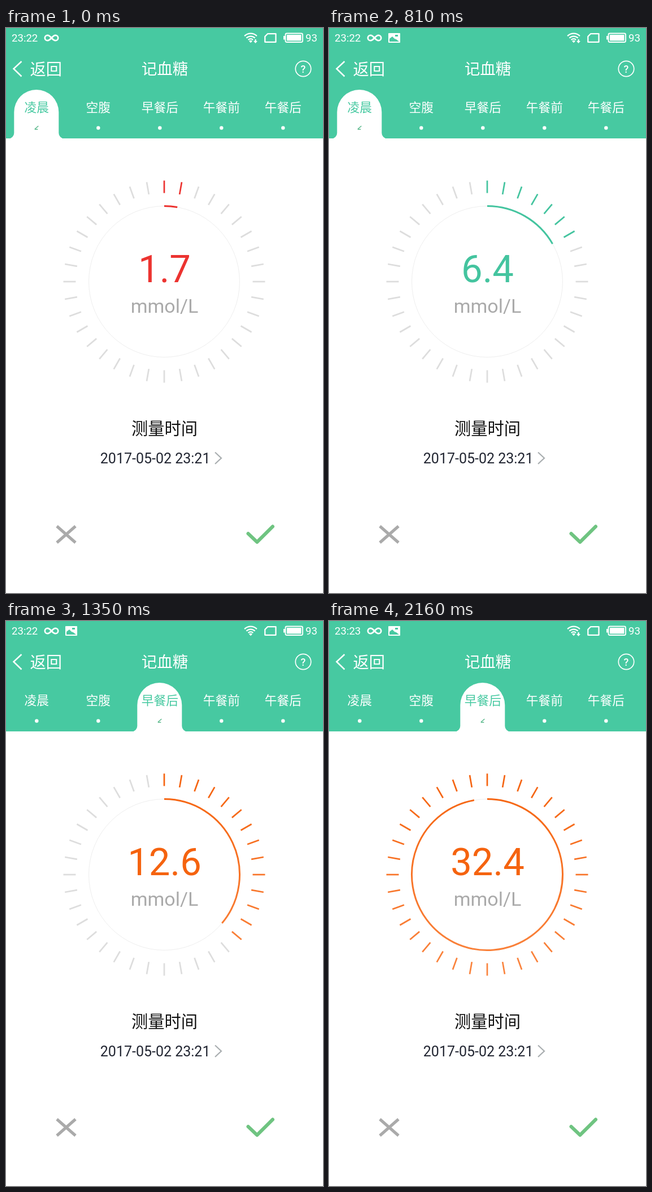
Write an HTML page that moves like this. It is 561 px wide and 998 px high and loops after 2430 ms.

```html
<!DOCTYPE html>
<html lang="zh-CN">
<head>
<meta charset="utf-8">
<title>记血糖</title>
<style>
  html, body { margin: 0; width: 100%; height: 100%; overflow: hidden; background: #fff; }
  svg { display: block; width: 100%; height: 100%; }
  text { font-family: Roboto, "Noto Sans CJK SC", "Noto Sans CJK", sans-serif; }
  .cjk { font-family: "Noto Sans CJK SC", "Noto Sans CJK", sans-serif; font-weight: 300; }
  .line { fill: none; stroke: #fff; }
</style>
</head>
<body>
<svg viewBox="0 0 561 998" xmlns="http://www.w3.org/2000/svg">
  <defs>
    <linearGradient id="tint" gradientUnits="userSpaceOnUse" x1="0" x2="0">
      <stop id="tintTop" offset="0"/><stop id="tintEnd" offset="1"/>
    </linearGradient>
  </defs>
  <rect width="561" height="998" fill="#fff"/>
  <rect width="561" height="195" fill="#47c9a1"/>

  <g fill="#fff" font-size="18.6">
    <text id="clock" x="10" y="24"/>
    <path class="line" stroke-width="2.7" d="M80.5 17.5C77 13.5 75 12.8 73.5 12.8a4.7 4.7 0 0 0 0 9.4C75 22.2 77 21.5 80.5 17.5S86 12.8 87.5 12.8a4.7 4.7 0 0 1 0 9.4C86 22.2 84 21.5 80.5 17.5Z"/>
    <g id="picture">
      <rect x="105" y="9" width="21" height="17" rx="1"/>
      <path fill="#47c9a1" d="M107 23v-4l5-4 4 4 3 1 5 4h-17zM117 12h5v3h-5z"/>
    </g>
    <g id="plugged">
      <circle cx="115" cy="17.5" r="8"/>
      <path class="line" stroke-width="1.6" d="M143 11V24M143 21l-4.5-3v-4M143 19l4.5-3v-3"/>
      <path d="M143 7l3 4.5h-6zM136.700 12h3.600v3.600h-3.600zM145.700 11h3.600v3.600h-3.600z"/>
      <circle cx="143" cy="25" r="2.300"/>
      <path d="M470 10l-6.500 8.500h4l-2 7 8-9.500h-4.500z"/>
    </g>
    <g id="signal">
      <path class="line" stroke-width="2.300" d="M422.100 14.100a15.500 15.500 0 0 1 21.800 0M425.400 17.700a10.700 10.700 0 0 1 15.200 0M428.700 21a6 6 0 0 1 8.600 0"/>
      <path d="M433 26.300l-3-3.300a4.200 4.200 0 0 1 6 0z"/>
      <g id="traffic">
        <path d="M437.500 19h7v8h-7z" fill="#47c9a1"/>
        <path id="arrow"/>
      </g>
      <path class="line" stroke-width="2.300" stroke-linejoin="round" d="M463 10.200H477.500V24.800H458.300V15z"/>
    </g>
    <g id="battery">
      <rect class="line" x="494.500" y="9.500" width="30.500" height="15.500" rx="2.500" stroke-width="1.900"/>
      <rect x="497" y="12" width="25.500" height="10.500"/>
      <rect x="491" y="14" width="3" height="6.500"/>
    </g>
    <text id="charge" x="551" y="24" text-anchor="end"/>
  </g>

  <path class="line" stroke-width="2.500" d="M27.500 59L13.500 72L27.500 85.500"/>
  <g fill="#fff">
    <text class="cjk" x="42.500" y="82.500" font-size="28.300" style="font-weight:400">返回</text>
    <text class="cjk" x="281" y="81.500" font-size="27.500" text-anchor="middle">记血糖</text>
    <circle class="line" cx="526" cy="72" r="13.700" stroke-width="1.700"/>
    <text x="526" y="78.500" font-size="18" font-weight="500" text-anchor="middle">?</text>
  </g>

  <g id="tabShape">
    <path fill="#fff" d="M-49.500 195.500a10 10 0 0 0 10-10V148.500a39.500 39.500 0 0 1 79 0V185.500a10 10 0 0 0 10 10z"/>
    <path d="M3.500 173L-3 178.700M-3 179H2.500" fill="none" stroke="#5bb98c" stroke-width="1.500"/>
  </g>
  <g id="tabs"></g>

  <circle cx="280" cy="448" r="133.500" fill="none" stroke="#eee"/>
  <g id="ticks" stroke-width="2.700"></g>
  <path id="arc" fill="none" stroke="url(#tint)" stroke-width="3"/>
  <text id="value" x="280.500" y="448.500" font-size="67" text-anchor="middle"/>
  <text x="280.500" y="502.500" font-size="34" fill="#aaa" text-anchor="middle">mmol/L</text>

  <text class="cjk" x="280.500" y="718" font-size="29.300" fill="#111" text-anchor="middle">测量时间</text>
  <text id="date" x="166.800" y="768.500" font-size="25" fill="#222632"/>
  <path d="M370 749.500L381 759.700L370 770" fill="none" stroke="#a9aeb0" stroke-width="2.200"/>
  <path d="M90 880L123 909M123 880L90 909" stroke="#aaa" stroke-width="5.200"/>
  <path d="M428.500 893L444.300 908L472 880.500" fill="none" stroke="#6fc481" stroke-width="6" stroke-linecap="round" stroke-linejoin="round"/>
</svg>
<script>
const NS = 'http://www.w3.org/2000/svg';
const $ = id => document.getElementById(id);
const set = (el, attrs) => {
  for (const k in attrs) el.setAttribute(k, attrs[k]);
  return el;
};
const add = (parent, tag, attrs) =>
  parent.appendChild(set(document.createElementNS(NS, tag), attrs));
const show = (id, on) => set($(id), { visibility: on ? 'visible' : 'hidden' });

const STEP = 270, CX = 280, CY = 448, TICKS = 36, MAX = 33;
const RED = ['#ec3330', '#ec3330', 269, 626];
const GREEN = ['#44c49f', '#69bf74', 415, 500];
const ORANGE = ['#f5630f', '#fa8540', 269, 626];

const states = [
  { value: 1.7, tab: 0, tint: RED, net: 'down' },
  { value: 3.0, tab: 1, tint: RED, net: 'up', plugged: true },
  { value: 3.7, tab: 0, tint: RED },
  { value: 6.4, tab: 0, tint: GREEN, net: 'down' },
  { value: 9.5, tab: 2, tint: GREEN },
  { value: 12.6, tab: 2, tint: ORANGE },
  { value: 15.9, tab: 2, tint: ORANGE, net: 'down' },
  { value: 24.1, tab: 2, tint: ORANGE },
  { value: 32.4, tab: 2, tint: ORANGE, net: 'down', clock: '23:23' }
];
const arrows = {
  down: 'M440.300 20h2.400v3h2.300l-3.500 4-3.500-4h2.300z',
  up: 'M440.300 27h2.400v-3h2.300l-3.500-4-3.500 4h2.300z'
};

const polar = (r, deg) => {
  const a = deg * Math.PI / 180;
  return [CX + r * Math.sin(a), CY - r * Math.cos(a)];
};
const tabX = i => 54.3 + 109 * i;

const tabs = ['凌晨', '空腹', '早餐后', '午餐前', '午餐后'].map((name, i) => {
  const label = add($('tabs'), 'text', {
    class: 'cjk', x: tabX(i), y: 148, 'font-size': 21.7, 'text-anchor': 'middle'
  });
  label.textContent = name;
  const dot = add($('tabs'), 'circle', { cx: tabX(i), cy: 176.5, r: 3.2, fill: '#fff' });
  return { label, dot };
});

const ticks = Array.from({ length: TICKS }, (_, i) => {
  const [x1, y1] = polar(156.5, i * 10);
  const [x2, y2] = polar(178.5, i * 10);
  return add($('ticks'), 'line', { x1, y1, x2, y2 });
});

// Blend the tint by height, as the arc's gradient does.
function tintAt(y, [top, end, y1, y2]) {
  const p = Math.max(0, Math.min(1, (y - y1) / (y2 - y1)));
  return `color-mix(in srgb, ${end} ${p * 100}%, ${top})`;
}

function drawDial({ value, tint }) {
  const last = Math.floor(value * TICKS / MAX);
  const [x, y] = polar(133.5, last * 10);
  set($('tint'), { y1: tint[2], y2: tint[3] });
  set($('tintTop'), { 'stop-color': tint[0] });
  set($('tintEnd'), { 'stop-color': tint[1] });
  set($('arc'), { d: `M${CX} ${CY - 133.5}A133.5 133.5 0 ${+(last > 18)} 1 ${x} ${y}` });
  ticks.forEach((tick, i) => {
    const mid = polar(167, i * 10)[1];
    tick.style.stroke = i <= last ? tintAt(mid, tint) : '#ddd';
  });
  set($('value'), { fill: tint[0] }).textContent = value.toFixed(1);
}

function drawStatus({ plugged, net, clock }) {
  $('clock').textContent = plugged ? '14:13' : clock || '23:22';
  $('charge').textContent = plugged ? '100' : '93';
  $('date').textContent = '2017-05-02 ' + (plugged ? '14:13' : '23:21');
  set($('signal'), { transform: `translate(${plugged ? -27 : 0} 0)` });
  set($('battery'), { transform: `translate(${plugged ? -9.5 : 0} 0)` });
  show('plugged', plugged);
  show('traffic', net);
  if (net) set($('arrow'), { d: arrows[net] });
}

function drawTabs(active) {
  set($('tabShape'), { transform: `translate(${tabX(active) - 0.5} 0)` });
  tabs.forEach(({ label, dot }, i) => {
    set(label, { fill: i === active ? '#47c9a1' : '#fff' });
    set(dot, { visibility: i === active ? 'hidden' : 'visible' });
  });
}

let shown = -1;
function render(time) {
  const step = Math.floor(time / STEP) % states.length;
  if (step === shown) return;
  shown = step;
  const state = states[step];
  drawDial(state);
  drawStatus(state);
  drawTabs(state.tab);
  show('picture', step > 1);
}

const start = performance.now();
function loop(now) {
  render(Math.max(0, now - start));
  requestAnimationFrame(loop);
}
render(0);
requestAnimationFrame(loop);
</script>
</body>
</html>
```
